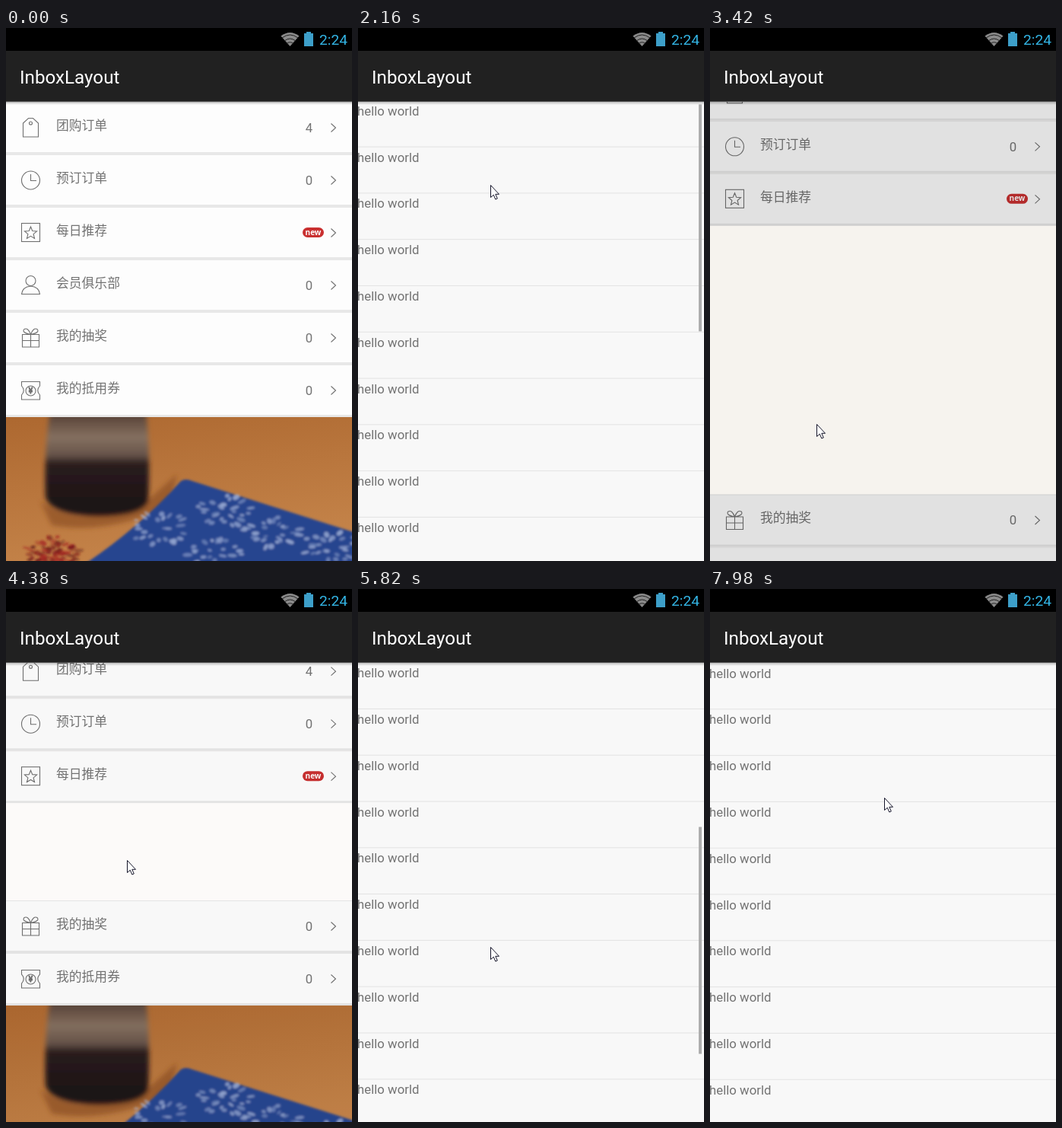
Animation of 455 by 700 pixels, one loop 8 s. Source, as an HTML page:

```html
<!DOCTYPE html>
<html lang="zh">
<head>
<meta charset="utf-8">
<title>InboxLayout</title>
<style>
html, body { margin: 0; width: 100%; height: 100%; overflow: hidden; background: #000; }
svg { display: block; }
text { font-family: Roboto, "Noto Sans CJK SC", "Noto Sans CJK", sans-serif; }
#menu text, #list text { font-size: 16.8px; fill: #737373; }
#menu .badge { font: 700 10px "Open Sans", sans-serif; fill: #fff; }
#menu .yen { font-size: 10px; }
.mid { text-anchor: middle; }
.icon { fill: none; stroke: #707070; stroke-width: 1.1; }
.dim { opacity: var(--dim); }
</style>
</head>
<body>
<svg id="stage" width="455" height="700" viewBox="0 0 455 700">
  <defs>
    <linearGradient id="wood" x2=".3" y2="1">
      <stop offset="0" stop-color="#ad6830"/><stop offset="1" stop-color="#c48349"/>
    </linearGradient>
    <linearGradient id="jar" x2="0" y2="1">
      <stop offset="0" stop-color="#513b30"/><stop offset=".25" stop-color="#857060"/>
      <stop offset=".42" stop-color="#67544a"/><stop offset=".5" stop-color="#2a1c1c"/><stop offset="1" stop-color="#1a1116"/>
    </linearGradient>
    <linearGradient id="fall" x2="0" y2="1">
      <stop offset="0" stop-opacity=".35"/><stop offset="1" stop-opacity="0"/>
    </linearGradient>
    <linearGradient id="rise" x2="0" y2="1">
      <stop offset="0" stop-opacity="0"/><stop offset="1" stop-opacity=".35"/>
    </linearGradient>
    <filter id="soft"><feGaussianBlur stdDeviation="3"/></filter>
    <filter id="faint"><feGaussianBlur stdDeviation="1.6"/></filter>
  </defs>

  <rect y="97" width="455" height="603" fill="#fcfbfa"/>
  <rect id="gap" y="97" width="455" height="603" fill="#f6f3ee"/>
  <g id="menu"></g>
  <svg id="photo" width="455" height="189">
    <rect width="455" height="189" fill="url(#wood)"/>
    <g filter="url(#soft)">
      <path d="M45 110 Q100 150 185 110 L225 75 L215 118 Q130 155 60 142Z" fill="#85481f" opacity=".6"/>
      <path d="M58 -8 H184 Q190 40 187 110 Q180 130 118 130 Q58 128 52 105 Q50 40 58 -8Z" fill="url(#jar)"/>
    </g>
    <g filter="url(#faint)">
      <path d="M105 192 Q175 145 230 84 Q236 80 245 84 L460 152 V192Z" fill="#27458f"/>
      <g id="blooms"></g>
    </g>
    <rect class="dim" width="455" height="189"/>
  </svg>

  <g id="list">
    <rect y="-18" width="455" height="18" fill="url(#rise)"/>
    <rect y="1216" width="455" height="18" fill="url(#fall)"/>
    <rect width="455" height="1216" fill="#f8f8f8"/>
  </g>
  <rect id="bar" x="448" width="4" height="298" fill="#adadad"/>

  <rect y="95" width="455" height="6" fill="url(#fall)"/>
  <rect width="455" height="97" fill="#212121"/>
  <rect width="455" height="30"/>
  <rect y="96" width="455" height="1" fill="#555"/>
  <text x="18" y="73" font-size="24.2" fill="#fff">InboxLayout</text>
  <path d="M373.5 24L361.5 10.5Q373.5 1.5 385.5 10.5Z" fill="#8a8a8a"/>
  <path d="M363 13Q373.5 5 384 13M366 17Q373.5 11 381 17M369 20.5Q373.5 17 378 20.5" fill="none" stroke="#222"/>
  <path d="M392 7H395V5H401V7H404V24H392Z" fill="#3d9fc9"/>
  <text x="412" y="22" font-size="19.2" fill="#33b5e5">2:24</text>
  <path id="cursor" d="M.5 .5V16.5L4.3 13.2L6.8 19L9.3 18L6.8 12.3H11.5Z" fill="#fff" stroke="#15152a"/>
</svg>

<script>
const $ = id => document.getElementById(id);
const TOP = 97, BOTTOM = 700, PITCH = 69, ITEM = 60.8, ITEMS = 20;
const MAX_SCROLL = ITEM * ITEMS - (BOTTOM - TOP);

const star = Array.from({length: 10}, (_, i) => {
  const r = i % 2 ? 3.8 : 8.5, a = i * Math.PI / 5;
  return [32.5 + r * Math.sin(a), 34.5 - r * Math.cos(a)];
}).join(' ');

// Label, right-hand text and icon of each menu row
const rows = [
  ['团购订单', '4', '<path d="M22.5 46V28L29.5 21.5H35.5L42.5 28V46Z"/><circle cx="32.5" cy="28" r="2"/>'],
  ['预订订单', '0', '<circle cx="32.5" cy="34" r="12"/><path d="M32.5 26V34.5H40"/>'],
  ['每日推荐', 'new', `<rect x="20.5" y="21.5" width="24" height="24"/><polygon points="${star}"/>`],
  ['会员俱乐部', '0', '<circle cx="32.5" cy="28" r="6.5"/><path d="M20.5 45.5Q21.5 36 32.5 35Q43.5 36 44.5 45.5Z"/>'],
  ['我的抽奖', '0', '<path d="M21.5 29.5H43.5V46H21.5ZM21.5 37.5H43.5M32.5 29.5V46M32.5 29.5Q20 27 24 22.5Q29 20 32.5 29.5Q36 20 41 22.5Q45 27 32.5 29.5"/>'],
  ['我的抵用券', '0', '<path d="M20.5 22.5H44.5V28Q39 34 44.5 40V46H20.5V40Q26 34 20.5 28Z"/><circle cx="32.5" cy="34.5" r="6.5"/><text class="yen mid" x="32.5" y="38">¥</text>']
];

$('menu').innerHTML = rows.map(([label, info, icon]) => `<g>
  <rect width="455" height="69" fill="#e8e8e8"/>
  <rect y="1" width="455" height="65" fill="#fdfdfd"/>
  <g class="icon">${icon}<path d="M427.5 28.5L433.5 34L427.5 39.5"/></g>
  <text x="66" y="37">${label}</text>
  ${info == 'new'
    ? '<rect x="390" y="27" width="28" height="13" rx="6.5" fill="#c93030"/><text class="badge mid" x="404" y="36.5">new</text>'
    : `<text class="mid" x="398.5" y="40">${info}</text>`}
  <rect class="dim" width="455" height="69"/></g>`).join('');

let items = '';
for (let i = 0; i < ITEMS; i++)
  items += `<text x="-1" y="${i * ITEM + 19.5}">hello world</text>
    <rect y="${(i + 1) * ITEM - .5}" width="455" height="1" fill="#e3e3e3"/>`;
$('list').insertAdjacentHTML('beforeend', items);

let seed = 7;
const rnd = () => (seed = seed * 16807 % 2147483647) / 2147483647;

// A blurred flower: rings of petals around a centre
function bloom(x, y, size, color) {
  let out = '';
  for (let i = 0; i < 26; i++) {
    const d = size * (.25 + .75 * rnd());
    out += `<ellipse cx="${d}" rx="${3 + 4 * rnd()}" ry="${2 + 2 * rnd()}" fill="${color}" opacity="${.4 + .4 * rnd()}"
      transform="translate(${x} ${y}) scale(1 .6) rotate(${i * 137.5})"/>`;
  }
  return out;
}
const pale = [[202, 146], [288, 124], [350, 152], [275, 180], [425, 170]];
$('blooms').innerHTML = pale.map(([x, y]) => bloom(x, y, 38, '#a9b9dd')).join('')
  + bloom(62, 180, 40, '#5c1214') + bloom(64, 184, 34, '#7a1518') + bloom(60, 178, 36, '#a3201f');

const clamp = (v, lo, hi) => Math.max(lo, Math.min(hi, v));
const ease = (t, from, to) => .5 - .5 * Math.cos(Math.PI * clamp((t - from) / (to - from), 0, 1));

// Pointer moves: start, end, target x, target y
const moves = [
  [360, 600, 166, 354], [900, 960, 166, 359], [1740, 2100, 174, 208],
  [2145, 2280, 174, 150], [2340, 2580, 170, 208], [2580, 3000, 140, 520],
  [3480, 4080, 159, 356], [4800, 5000, 172, 560], [5000, 5600, 174, 134],
  [5600, 5800, 174, 470], [5820, 6180, 180, 283], [6300, 6780, 225, 486],
  [6780, 7240, 231, 297], [7310, 7500, 229, 274]
];
function pointer(t) {
  let x = 398, y = 101;
  for (const [from, to, nx, ny] of moves) {
    const k = ease(t, from, to);
    x += (nx - x) * k;
    y += (ny - y) * k;
  }
  return {x, y};
}

// Drags: press, release, time at which their effect is dropped
const drags = [[2100, 3000, 4100], [5000, 5600, 7550], [5820, 6180, 7550], [6780, 7240, 7550]];
const toggles = [1320, 3330, 4324, 7265, 7612];   // the list opens and closes in turn

function draw(t) {
  const open = toggles.reduce((sum, s, i) => sum + (i % 2 ? -1 : 1) * ease(t, s, s + 260), 0);

  // Dragging scrolls the list; past either end it pulls with resistance
  const dragged = drags.reduce((sum, [press, release, drop]) =>
    t < press || t >= drop ? sum : sum + pointer(press).y - pointer(Math.min(t, release)).y, 0);
  const scroll = clamp(dragged, 0, MAX_SCROLL);
  const pull = (scroll - dragged) * .47;

  const pivot = t > 7550 ? 2 : 3;
  const up = open * (Math.max(pull, 0) - PITCH * pivot);
  const down = open * (BOTTOM - TOP - PITCH * (pivot + 1) + Math.min(pull, 0));
  [...$('menu').children].forEach((row, i) => {
    row.setAttribute('transform', `translate(0 ${TOP + PITCH * i + (i < pivot ? up : down)})`);
    row.style.display = i == pivot && open > 0 ? 'none' : '';
  });
  $('photo').setAttribute('y', TOP + PITCH * rows.length + down);
  $('gap').setAttribute('opacity', Math.min(1, open * 1.4));
  $('stage').style.setProperty('--dim', (.34 - .0012 * Math.abs(pull)) * Math.max(open, 0) ** 1.3);

  $('list').style.display = open > .999 ? '' : 'none';
  $('list').setAttribute('transform', `translate(0 ${TOP + pull - scroll})`);
  const scrolling = Math.abs(pull) < 1 && drags.some(([press, release]) => t >= press && t < release + 500);
  $('bar').style.display = scrolling ? '' : 'none';
  $('bar').setAttribute('y', 99.5 + scroll / 2);

  const {x, y} = pointer(t);
  $('cursor').style.display = t < 360 ? 'none' : '';
  $('cursor').setAttribute('transform', `translate(${Math.round(x)} ${Math.round(y)})`);
}

const start = performance.now();
function tick() {
  const t = (performance.now() - start) % 8000;
  draw(Math.floor(t / 60) * 60);
  requestAnimationFrame(tick);
}
tick();
</script>
</body>
</html>
```
